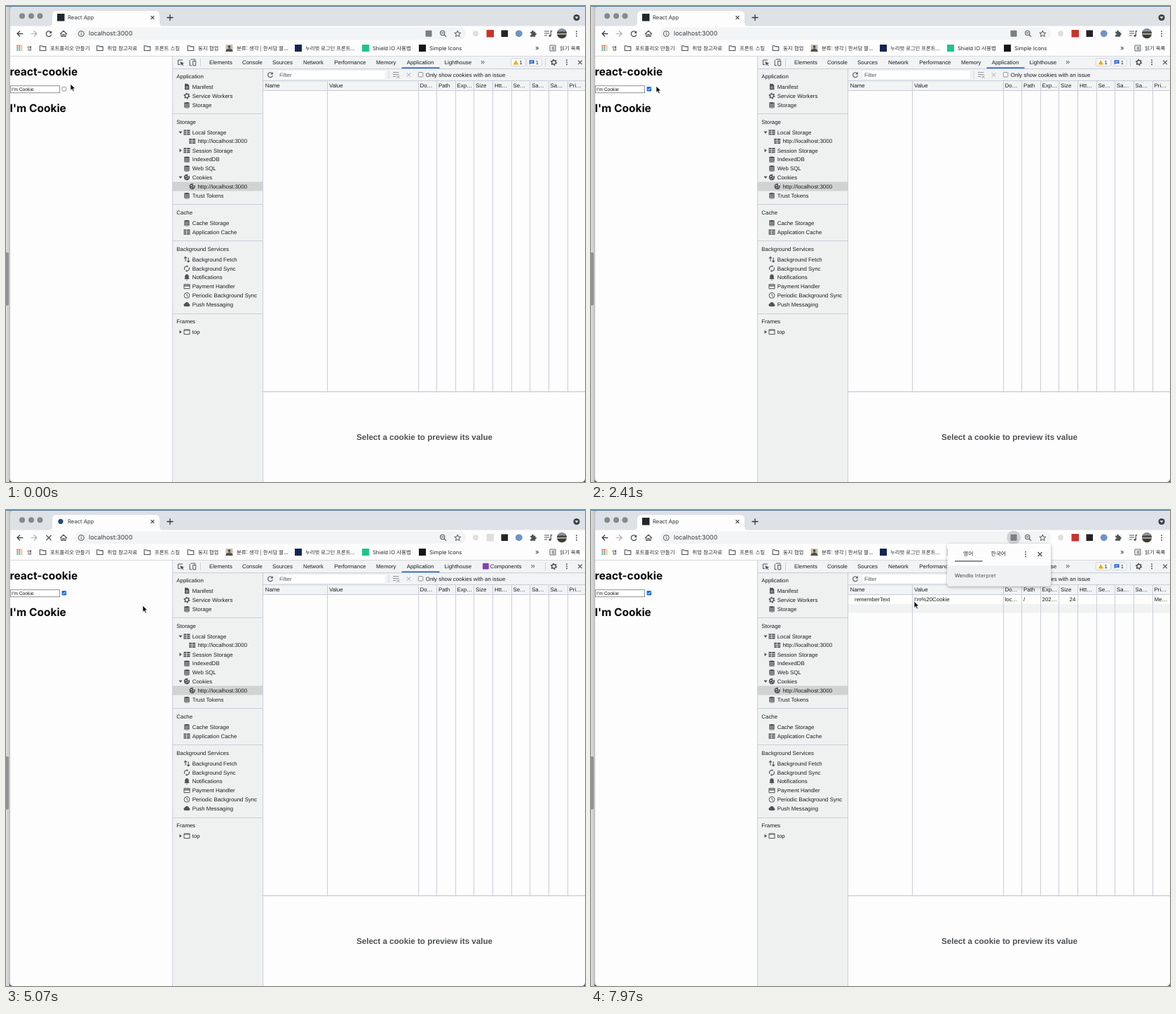
An HTML page that plays this animation: 826 px wide and 678 px high, repeating every 7990 ms.

```html
<!DOCTYPE html>
<html lang="ko">
<head>
<meta charset="utf-8">
<title>react-cookie</title>
<style>
html, body { margin: 0; width: 100%; height: 100%; overflow: hidden; background: #fdfdfd; }
svg { display: block; width: 826px; height: 678px; }
text { white-space: pre; text-rendering: geometricPrecision; font-family: "Liberation Sans", Arial, sans-serif; }
.ui { font-family: Inter, "Noto Sans CJK KR", "Noto Sans CJK", sans-serif; }
.ko { font-family: "Noto Sans CJK KR", "Noto Sans CJK", sans-serif; }
</style>
</head>
<body>
<svg id="stage" viewBox="0 0 826 678" xmlns="http://www.w3.org/2000/svg"></svg>
<script>
const LOOP = 7990;
const CLICK = 1150, RELOAD = 4700, LOADED = 5350, POPUP = 5650;
const INK = '#505357', RULE = '#cbcdd9', PANEL = '#eff1f1';

const rect = (x, y, w, h, fill, more = '') =>
  `<rect x="${x}" y="${y}" width="${w}" height="${h}" fill="${fill}" ${more}/>`;
const circle = (x, y, r, fill, more = '') => `<circle cx="${x}" cy="${y}" r="${r}" fill="${fill}" ${more}/>`;
const text = (x, y, s, size = 7.9, fill = '#1b1d1f', more = '') =>
  `<text x="${x}" y="${y}" font-size="${size}" fill="${fill}" ${more}>${s}</text>`;
const ui = (x, y, s, size, fill, more = '') => text(x, y, s, size, fill, 'class="ui" ' + more);
const ko = (x, y, s, size = 7.4, fill = '#2b2b2b') => text(x, y, s, size, fill, 'class="ko"');
const fillPath = (d, fill = INK, more = '') => `<path d="${d}" fill="${fill}" ${more}/>`;
const stroke = (d, color = INK, width = 1.1) =>
  `<path d="${d}" fill="none" stroke="${color}" stroke-width="${width}"/>`;
const ring = (x, y, r, width = 1.1) => circle(x, y, r, 'none', `stroke="${INK}" stroke-width="${width}"`);
const at = (x, y, body) => `<g transform="translate(${x} ${y})">${body}</g>`;
const group = (id, body) => `<g id="${id}">${body}</g>`;
const hline = (x1, x2, y, color = RULE, w = 1) => stroke(`M${x1} ${y}H${x2}`, color, w);
const vline = (x, y1, y2, color = RULE, w = 1) => stroke(`M${x} ${y1}V${y2}`, color, w);
const dots = (x, y, gap = 3.3) => [-gap, 0, gap].map(d => circle(x, y + d, .95, INK)).join('');
const cross = (x, y, r, color = '#444', w = 1.2) =>
  at(x, y, stroke(`M${-r} ${-r}L${r} ${r}M${r} ${-r}L${-r} ${r}`, color, w));
const reload = (x, y, r, w = 1.3) => at(x, y,
  stroke(`M${r * .75} ${-r * .65}A${r} ${r} 0 1 0 ${r} ${r * .3}`, INK, w) +
  fillPath(`M${r * 1.1} ${-r * 1.15}v${r}h${-r}z`));
const gear = r => ring(0, 0, r * .62, 1.4) +
  circle(0, 0, r * .9, 'none', `stroke="${INK}" stroke-width="1.3" stroke-dasharray="${r * .45} ${r * .492}"`);

const icons = {
  doc: fillPath('M-3-4.2h4L3.3-2v6.2H-3z') + stroke('M-1.5.2h3.2M-1.5 2h3.2', PANEL, .7),
  gear: gear(4.2),
  db: fillPath('M-4-2.6C-4-4.6 4-4.6 4-2.6V3C4 5-4 5-4 3z') +
    stroke('M-4-1.7C-3-.5 3-.5 4-1.7M-4 .5C-3 1.7 3 1.7 4 .5M-4 2.7C-3 3.9 3 3.9 4 2.7', PANEL, .7),
  grid: fillPath('M-4.5-3.6h9v7.2h-9z') + stroke('M-4.5-1.2h9M-4.5 1.3h9M-.3-3.6v7.2', PANEL, .8),
  cookie: circle(0, 0, 4.2, INK) + circle(-1.4, -1.2, .9, PANEL) + circle(1.6, .6, .8, PANEL) +
    circle(-.9, 2, .7, PANEL) + circle(2.2, -2.5, 1.2, PANEL),
  swap: stroke('M-2 2.5v-6M-4-1.7l2-2 2 2M2.2-2.5v6M.2 1.8l2 2 2-2'),
  sync: stroke('M-3 1.8A3.4 3.4 0 0 1 .5-3.3M3-1.8A3.4 3.4 0 0 1-.5 3.3') + fillPath('M0-5v3.6l2-1.8zM0 5V1.4l-2 1.8z'),
  bell: fillPath('M-3.8 2.6l1-1.2v-2.6c0-4 5.6-4 5.6 0v2.6l1 1.2zM-1 3.2h2c0 1.4-2 1.4-2 0zM-.6-4.6h1.2v1.5h-1.2z'),
  card: stroke('M-4-3.1h8v6.2h-8z', INK, 1) + rect(-4, -1.8, 8, 1.6, INK),
  clock: ring(0, 0, 3.9, 1) + stroke('M0-2.4V.2L1.8 1.4', INK, .9),
  cloud: fillPath('M-2.6 3a2.2 2.2 0 0 1-.3-4.3A3.2 3.2 0 0 1 3.1-.8 2 2 0 0 1 2.9 3z'),
  frame: stroke('M-4-3.3h8v6.6h-8z', INK, 1) + hline(-4, 4, -2.4, INK, 1)
};

function browserChrome() {
  const folder = (x, label) => at(x, 60, stroke('M-4.3-3.3h3l1.2 1.2h4.4v5.6h-8.6z')) + ko(x + 10.5, 62.7, label);
  const appColors = ['#dd4b3e', '#dd4b3e', '#e8b42c', '#39a05a', '#4a80e0', '#e8b42c', '#39a05a', '#4a80e0', '#e8b42c'];
  return rect(6, 0, 820, 29, '#dee1e6') +
    fillPath('M60 29q6 0 6-6V13q0-6 6-6h141q6 0 6 6v10q0 6 6 6z', '#fdfdfd') +
    [23, 36, 48.5].map(x => circle(x, 14.3, 4, '#87898c')).join('') +
    group('favicon', rect(73, 11, 10.5, 10.5, '#20272d')) +
    group('spinner', circle(78, 16.3, 3.6, '#2b4a73')) +
    ui(88, 19.3, 'React App', 7.7, '#33363a') + cross(209, 16.5, 2.4) +
    stroke('M229.5 16.5h9M234 12v9', '#33363a', 1.3) +
    circle(814, 16.5, 4.6, '#3f4246') + fillPath('M811.6 15.2h4.8l-2.4 3z', '#fff') +
    rect(6, 28.5, 820, 43, '#fdfdfd') + rect(98, 30.5, 558, 17.5, '#f3f4f5', 'rx="8.7"') +
    at(20, 39.5, stroke('M4.2 0h-8M0-4l-4 4 4 4', '#45484c', 1.3)) +
    at(40, 39.5, stroke('M-4.2 0h8M0-4l4 4-4 4', '#aaadb2', 1.2)) +
    group('reload', reload(61, 39.5, 3.8)) + group('stop', cross(61, 39.5, 3.5, INK, 1.3)) +
    at(82, 39.5, stroke('M-4.8.2L0-4.2 4.8.2M-3.2-1v5h2.2V1h2v3h2.2v-5', INK, 1.2)) +
    ring(107.3, 39.5, 4, 1) + stroke('M107.3 38.7v3M107.3 36.7v1.1', INK, 1) +
    ui(118, 42.4, 'localhost:3000', 8.85, '#33363a') +
    ring(622.7, 38.4, 3.1) + stroke('M625 40.8l3 3M621.2 38.4h3', INK, 1.2) +
    at(644.3, 39.4, stroke('M0-4.4L1.2-1.3l3.3.2L2 .9l.8 3.2L0 2.4l-2.8 1.7.8-3.2-2.5-2 3.3-.2z', INK, 1)) +
    circle(670, 39.3, 4, '#dfdfe0') +
    group('extension', rect(685.5, 34, 10.5, 10.5, '#c5352c')) +
    group('extensionOff', rect(685.5, 34, 10.5, 10.5, '#dedede')) +
    rect(706.5, 34.5, 9.5, 9.5, '#242424') + circle(731.7, 39.3, 4.9, '#6f94c6') +
    at(752, 39.5, fillPath('M-4-2.8h2.2c-.7-2.6 3.3-2.6 2.6 0H3.2V-.6c2.3-.6 2.3 2.9 0 2.3v2.5h-7.2V1.8c2.2.2 2.2-2.7 0-2.5z')) +
    stroke('M768 36h7M768 39h7M768 42h4M777.3 42v-6.3h2', INK, 1.2) + circle(776, 42.3, 1.6, INK) +
    '<clipPath id="avatar"><circle cx="793" cy="39.3" r="7"/></clipPath><g clip-path="url(#avatar)">' +
    rect(786, 32, 14, 15, '#3d3a35') + rect(786, 32, 14, 4.5, '#8795a3') + rect(786, 38.7, 14, 2.2, '#a5a39a') + '</g>' +
    dots(814, 39.5) +
    appColors.map((c, i) => rect(15.3 + i % 3 * 3, 55.7 + (i / 3 | 0) * 3, 2, 2, c)).join('') +
    ko(30, 62.7, '앱') + folder(52.5, '포트폴리오 만들기') + folder(134, '취업 참고자료') +
    folder(201.5, '프론트 스킬') + folder(263.5, '둥지 협업') +
    rect(313.5, 55, 10, 10, '#c9c0b2') + circle(318.5, 58, 2, '#55504b') + fillPath('M313.5 65c0-6 10-6 10 0z', '#55504b') +
    ko(329, 62.7, '분류: 생각 | 한서담 블...', 7.45) +
    rect(412, 55, 10, 10, '#142554') + ko(427, 62.7, '누리벗 로그인 프론트...', 7.3) +
    rect(508, 55, 10, 10, '#20c48e') + ui(523, 62.5, 'Shield IO 사용법', 7.55, '#2b2b2b') +
    rect(589, 55, 10, 10, '#151515') + ui(604, 62.5, 'Simple Icons', 7.7, '#2b2b2b') +
    ui(755, 62.8, '»', 9.5, '#333') +
    stroke('M776 56h8v8h-8zM778.5 58.5h4M778.5 60.3h4M778.5 62h4', INK, .9) + ko(790, 62.7, '읽기 목록') +
    hline(6, 826, 71.5, '#d6d8df');
}

function page() {
  const heading = (y, s) => ui(5.5, y, s, 15.5, '#060606', 'font-weight="700"');
  return heading(99, 'react-cookie') + heading(150.7, "I'm Cookie") +
    rect(6.3, 113.7, 70.3, 10, '#fff', 'stroke="#777" stroke-width=".8"') + text(8, 121.2, "I'm Cookie", 6.75, '#111') +
    group('unchecked', rect(80, 115.3, 5.7, 5.7, '#fff', 'rx="1" stroke="#777" stroke-width=".8"')) +
    group('checked', rect(79.6, 114.9, 6.5, 6.5, '#146fdc', 'rx="1"') + stroke('M81 118.3l1.3 1.4 2.7-3.2', '#fff', 1));
}

function sidebar() {
  const sections = [['Application', 100], ['Storage', 165], ['Cache', 294], ['Background Services', 346], ['Frames', 449.5]];
  // label, centre y, icon, indent, expander (1 open, 2 closed)
  const rows = [
    ['Manifest', 115, 'doc'], ['Service Workers', 128, 'gear'], ['Storage', 141, 'db'],
    ['Local Storage', 180, 'grid', 0, 1], ['http://localhost:3000', 192.5, 'grid', 7.7],
    ['Session Storage', 205.7, 'grid', 0, 2], ['IndexedDB', 218.5, 'db'], ['Web SQL', 231.3, 'db'],
    ['Cookies', 244, 'cookie', 0, 1], ['http://localhost:3000', 257, 'cookie', 7.7], ['Trust Tokens', 270, 'db'],
    ['Cache Storage', 309, 'db'], ['Application Cache', 322, 'grid'],
    ['Background Fetch', 361, 'swap'], ['Background Sync', 374, 'sync'], ['Notifications', 386.5, 'bell'],
    ['Payment Handler', 399.5, 'card'], ['Periodic Background Sync', 412.3, 'clock'], ['Push Messaging', 425, 'cloud'],
    ['top', 464.3, 'frame', 0, 2]
  ];
  return rect(238, 90, 128.5, 588, PANEL) + rect(238, 250.5, 128.5, 13, '#d1d2d2') +
    [153.5, 282.5, 334.5, 438.5].map(y => hline(238, 366, y)).join('') +
    sections.map(([s, y]) => text(243.3, y + 2.8, s)).join('') +
    rows.map(([s, y, icon, indent = 0, arrow]) =>
      at(258 + indent, y, icons[icon]) + text(265.7 + indent, y + 2.8, s) +
      (arrow ? at(249, y, fillPath(arrow === 1 ? 'M-2.5-1.5h5L0 2z' : 'M-1.5-2.5v5L2 0z')) : '')).join('') +
    vline(237.5, 72, 678) + vline(366.5, 90, 678);
}

function devtools() {
  const tabs = [['Elements', 290], ['Console', 337], ['Sources', 380], ['Network', 424], ['Performance', 468.3],
    ['Memory', 528], ['Application', 571.7], ['Lighthouse', 625.5]];
  const columns = [['Name', 369.7], ['Value', 461], ['Do…', 590.5], ['Path', 617], ['Exp…', 643.5], ['Size', 670],
    ['Htt…', 697], ['Se…', 723.5], ['Sa…', 750], ['Sa…', 776.5], ['Pri…', 803.5]];
  const cells = [['rememberText', 376], ["I'm%20Cookie", 461], ['loc…', 590.5], ['/', 617], ['202…', 643.5], ['24', 682.5], ['Me…', 803.5]];
  const badge = x => rect(x, 74.8, 21, 10.8, '#f7f8f9', 'rx="1.5" stroke="#cfd2da" stroke-width=".9"');
  return rect(238, 72, 588, 17.5, '#f1f3f4') + rect(367, 89.5, 459, 31, '#f1f3f4') +
    stroke('M252 77h-6.5v6.5h2.5', INK, 1) + fillPath('M248.5 79.2l5.8 2.3-2.5.8 1.6 2-1 .8-1.6-2-1.2 2z') +
    stroke('M263.5 76h6.5v1.5M265 84.8h-2.8V77M266.7 78.5h4v6.3h-4z', INK, 1) + vline(277.5, 75, 86, '#cfd2d8') +
    tabs.map(([s, x]) => text(x, 82.9, s)).join('') + rect(564.5, 87.3, 54, 1.8, '#2a6fd3') +
    group('badges', text(677, 83.3, '»', 11, INK) + badge(720.3) + badge(743) +
      fillPath('M727.3 77l3.6 6.5h-7.2z', '#e9ac13') + text(732.5, 82.9, '1', 7.5) +
      fillPath('M746.5 77h7v5h-5l-2 1.8z', '#2668ca') + stroke('M748 78.8h4M748 80.4h3', '#fff', .6) + text(755.8, 82.9, '1', 7.5)) +
    group('components', rect(680, 75.7, 8.8, 8.8, '#8144b5', 'rx="1"') + text(690.7, 82.9, 'Components') + text(748.5, 83.3, '»', 11, INK)) +
    vline(769.5, 75, 86, '#cfd2d8') + at(781.5, 80.3, gear(4.4)) + dots(800, 80.3, 3) + cross(819, 80.3, 2.8, INK, 1.1) +
    hline(238, 826, 89.5) + reload(377, 98, 3.4, 1.1) +
    rect(387, 91.5, 154, 12.8, '#fff', 'stroke="#e2e4e8" stroke-width=".6"') + text(390, 100.8, 'Filter', 7.9, INK) +
    vline(546, 92, 104, '#d4d6dc') +
    stroke('M552 94.5h8.5M552 97.5h8.5M552 100.5h4.5M557.5 99l4 3.7M561.5 99l-4 3.7', '#94979b', 1) + cross(574.5, 98, 2.7, '#a2a5a9', 1) +
    rect(588.3, 94.5, 6.5, 6.5, '#fff', 'rx="1" stroke="#777" stroke-width=".8"') + text(598.8, 100.8, 'Only show cookies with an issue') +
    hline(367, 826, 106.5) + hline(367, 826, 120.5) +
    group('cookie', rect(367, 134, 459, 12.7, '#f1f2f2') + cells.map(([s, x]) => text(x, 129.7, s)).join('')) +
    columns.map(([s, x]) => text(x, 116.2, s)).join('') +
    columns.slice(1).map(([, x]) => vline(Math.round(x - 3) + .5, 107, 549.5)).join('') +
    hline(367, 826, 549.5, '#bfc2cc', 1.2) +
    text(500, 618.2, 'Select a cookie to preview its value', 11.6, '#4d5156', 'font-weight="700"');
}

function translator() {
  return group('translate', circle(603, 39.3, 9.8, '#cfd1d4', 'id="pressed"') +
      rect(598.5, 34.8, 9, 9, '#7b7f84', 'rx="1"')) +
    group('popup', '<g filter="url(#shadow)">' + rect(508.5, 48, 147.5, 60.3, '#fdfdfd', 'rx="3"') + '</g>' +
      fillPath('M508.5 79H656v26.3q0 3-3 3H511.5q-3 0-3-3z', '#f0f1f2') +
      ko(531, 65.4, '영어', 7.8) + ko(570.5, 65.4, '한국어', 7.8) + rect(519, 72.2, 39.5, 1.3, INK) +
      dots(620, 63) + cross(640.5, 63, 3, '#45484c', 1.2) +
      ui(518.7, 96.3, '<tspan font-weight="500">Wendlo</tspan> Interpret', 7.4, '#5b5e63'));
}

const desktop =
  '<defs><linearGradient id="edge"><stop stop-color="#dedede"/><stop offset="1" stop-color="#c0c0c0"/></linearGradient>' +
  '<filter id="shadow" x="-10%" y="-20%" width="120%" height="150%"><feDropShadow dx="0" dy="1.5" stdDeviation="2.2" flood-opacity=".35"/></filter></defs>' +
  rect(0, 0, 826, 678, '#fdfdfd') + rect(0, 0, 6, 678, 'url(#edge)') +
  rect(-3, 351, 7, 75.5, '#929395', 'rx="2"');
const corners = rect(0, 0, 826, 1, '#4d7d9e') + fillPath('M6 1h5q-5 0-5 5z', '#bdbdbd') +
  fillPath('M5 673q0 5 6 5H5zM826 673q0 5-5 5h5z', '#493b42');
const pointer = group('pointer',
  fillPath('M0 0v9.4l2.2-2 1.5 3.6 1.7-.7-1.5-3.5h3z', '#080808', 'stroke="#fff" stroke-width=".8" stroke-linejoin="round"'));

document.getElementById('stage').innerHTML =
  desktop + browserChrome() + page() + devtools() + sidebar() + translator() + corners + pointer;

// time, x, y of the pointer tip
const track = [[0, 92, 111], [500, 92, 111], [1000, 84, 117], [1650, 84, 117], [2200, 93, 114],
  [2900, 93, 114], [3700, 195, 136], [6950, 195, 136], [7750, 461, 130], [LOOP, 461, 130]];

function pointerAt(t) {
  const i = track.findIndex((p, k) => k && t <= p[0]);
  const [t0, x0, y0] = track[i - 1], [t1, x1, y1] = track[i];
  const u = (t - t0) / (t1 - t0), e = u * u * (3 - 2 * u);
  return [x0 + (x1 - x0) * e, y0 + (y1 - y0) * e];
}

const show = (id, on) => document.getElementById(id).setAttribute('visibility', on ? 'inherit' : 'hidden');

function render(t) {
  const loading = t >= RELOAD && t < LOADED;
  const checked = t >= CLICK;
  show('checked', checked);
  show('unchecked', !checked);
  for (const id of ['spinner', 'stop', 'extensionOff', 'components']) show(id, loading);
  for (const id of ['favicon', 'reload', 'extension', 'badges', 'translate']) show(id, !loading);
  show('cookie', t >= LOADED);
  show('popup', t >= POPUP);
  show('pressed', t >= POPUP);
  document.getElementById('pointer').setAttribute('transform', `translate(${pointerAt(t).join(' ')})`);
}

const start = performance.now();
function tick() {
  render((performance.now() - start) % LOOP);
  requestAnimationFrame(tick);
}
tick();
</script>
</body>
</html>
```
